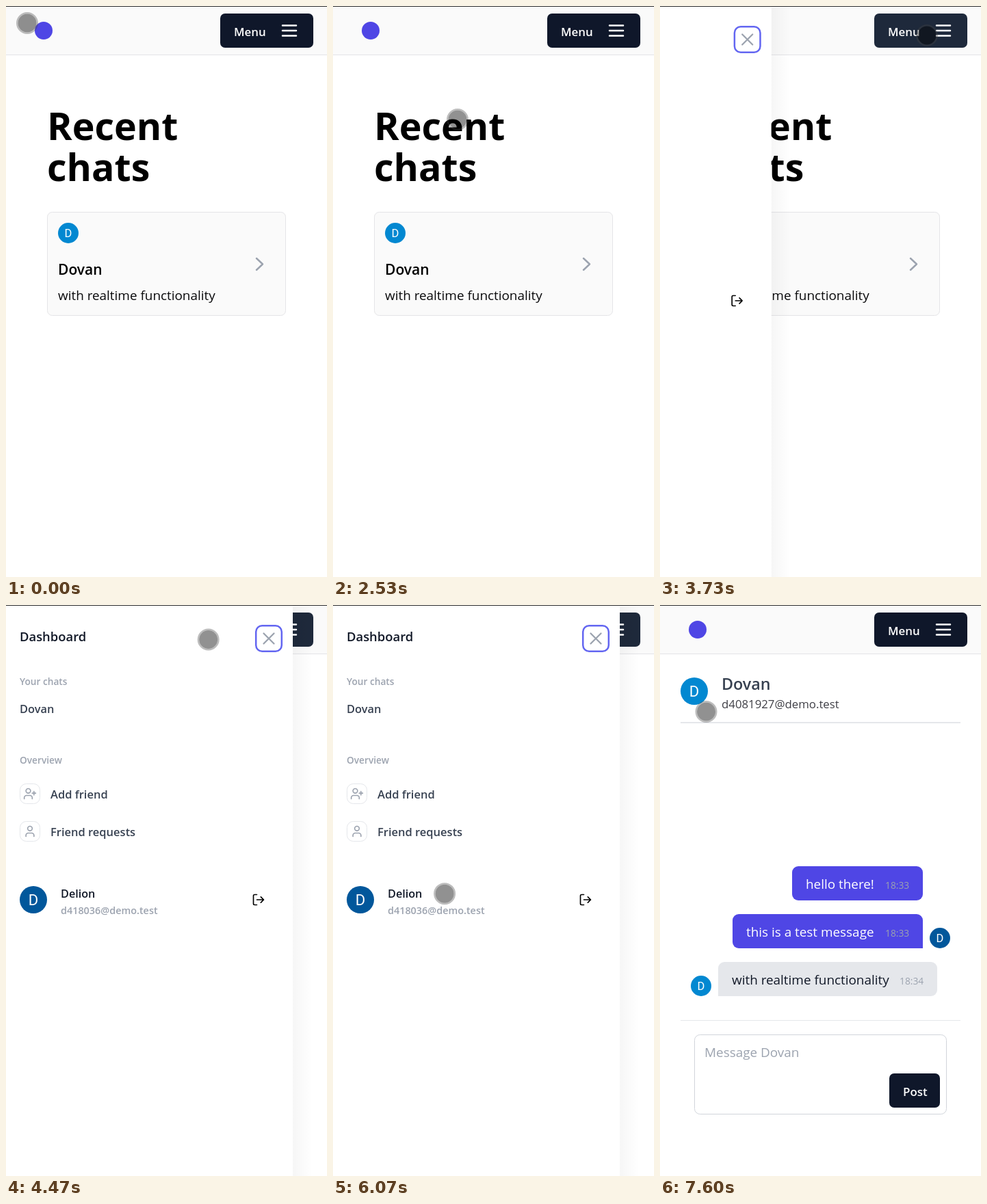
Recreate the animation shown at these times as an HTML page. Size 469 by 835 pixels, loop 8 s.

```html
<!DOCTYPE html>
<html lang="en">
<head>
<meta charset="utf-8">
<title>Chat app</title>
<style>
  html, body { margin: 0; width: 100%; height: 100%; overflow: hidden; background: #fff; }
  svg { display: block; width: 100%; height: 100%; font-family: "Open Sans", "Noto Sans", sans-serif; }
  .avatar { font-family: Roboto, sans-serif; text-anchor: middle; }
  .line { fill: none; stroke-linecap: round; stroke-linejoin: round; }
</style>
</head>
<body>
<svg id="stage" viewBox="0 0 469 835"></svg>
<script>
const LOOP = 8000, TICK = 1000 / 15, DRAWER_WIDTH = 419;
const TAP_MENU = 3580, TAP_FRIEND = 7000, OPEN_CHAT = 7530;
const FRIEND = 'Dovan', OWNER = 'Delion';
const INK = '#111827', SLATE = '#374151', GRAY = '#9ca3af', LINE = '#e5e7eb';
const NAVY = '#0f172a', INDIGO = '#4f46e5', SKY = '#0288d1', DEEP = '#01579b';

const text = (x, y, size, str, fill = INK, weight = 400, extra = '') =>
  `<text x="${x}" y="${y}" font-size="${size}" fill="${fill}" font-weight="${weight}" ${extra}>${str}</text>`;
const box = (x, y, w, h, r, fill, extra = '') =>
  `<rect x="${x}" y="${y}" width="${w}" height="${h}" rx="${r}" fill="${fill}" ${extra}/>`;
const outlined = (x, y, w, h, r, fill, color) =>
  box(x + .5, y + .5, w - 1, h - 1, r, fill, `stroke="${color}"`);
const line = (x, y, color, width, d, scale = 1) =>
  `<path class="line" transform="translate(${x} ${y}) scale(${scale})" stroke="${color}" stroke-width="${width}" d="${d}"/>`;
const icon = (x, y, color, d) => line(x, y, color, 2, d, 20 / 24);
const avatar = (x, y, r, fill) =>
  `<circle cx="${x}" cy="${y}" r="${r}" fill="${fill}"/>` +
  text(x, y + r * .4, r * 1.1, 'D', '#fff', 400, 'class="avatar"');
const button = (x, y, w, label, id) =>
  box(x, y, w, 50, 7, NAVY, `id="${id}"`) + text(x + 20, y + 33, 16.9, label, '#fff', 600);
const heading = (y, str) => text(60, y, 55.5, str, '#000', 700);
const label = (y, str) => text(20, y, 13.7, str, GRAY, 600);

// Speech bubble; the bottom corner beside an avatar stays square
function message(str, time, row, left, right, own, withAvatar) {
  const y = 382 + 70 * row, fill = own ? INDIGO : LINE;
  const side = withAvatar
    ? box(own ? right - 10 : left, y + 40, 10, 10, 0, fill) +
      avatar(own ? right + 25 : left - 25, y + 35, 15, own ? DEEP : SKY)
    : '';
  return box(left, y, right - left, 50, 9, fill) + side +
    text(left + 20, y + 33, 18.9, str, own ? '#fff' : INK) +
    text(right - 55, y + 33, 13.8, time, GRAY);
}

function action(str, row, glyph) {
  const y = 261 + 55 * row;
  return outlined(20, y, 30, 30, 9, '#fff', LINE) + icon(25, y + 5, GRAY, glyph) +
    text(65, y + 22, 16.5, str, SLATE, 600);
}

const person = x =>
  `M${x + 7} 21v-2a4 4 0 0 0-4-4H${x - 3}a4 4 0 0 0-4 4v2M${x - 4} 7a4 4 0 1 0 8 0a4 4 0 1 0-8 0`;

const header =
  box(0, 0, 469, 71, 0, '#fafafa') + box(0, 71, 469, 1, 0, '#e4e4e7') +
  `<circle cx="55" cy="36" r="13" fill="${INDIGO}"/>` +
  `<g id="focus">${box(308, 6, 146, 60, 12, '#94a3b8')}${box(310.5, 8.5, 141, 55, 9, '#fff')}</g>` +
  button(313, 11, 136, 'Menu', 'menu') +
  line(404, 36, '#fff', 2.5, 'M0-7.5h20M0 0h20M0 7.5h20');

const recent =
  heading(196, 'Recent') + heading(256, 'chats') +
  outlined(60, 301, 349, 152, 7, '#fafafa', '#e4e4e7') +
  avatar(91, 332, 15, SKY) +
  text(76, 393, 21, FRIEND, '#000', 600) +
  text(76, 430, 18.9, 'with realtime functionality', '#09090b') +
  line(366, 377.5, GRAY, 2.5, 'M0-8.5l9 8.5l-9 8.5');

const chat =
  avatar(50, 126, 20, SKY) +
  text(90, 124, 23.3, FRIEND, SLATE, 600) +
  text(90, 151, 16.8, 'd4081927@demo.test', '#3f3f46') +
  box(30, 171, 409, 2, 0, LINE) +
  message('hello there!', '18:33', 0, 193, 384, true, false) +
  message('this is a test message', '18:33', 1, 106, 384, true, true) +
  message('with realtime functionality', '18:34', 2, 85, 405, false, true) +
  box(30, 607, 409, 1, 0, LINE) +
  outlined(50, 628, 369, 117, 8, '#fff', '#d1d5db') +
  text(65, 661, 18.9, 'Message ' + FRIEND, GRAY) +
  button(335, 685, 74, 'Post', 'post');

const drawer =
  box(DRAWER_WIDTH, 0, 28, 835, 0, 'url(#shade)') + box(0, 0, DRAWER_WIDTH, 835, 0, '#fff') +
  text(20, 53, 18.4, 'Dashboard', INK, 600) +
  box(365.2, 30.2, 37.6, 37.6, 9, 'none', 'stroke="#6366f1" stroke-width="2.5"') +
  line(384, 49, GRAY, 2.3, 'M-7.5-7.5l15 15m0-15l-15 15') +
  label(117, 'Your chats') +
  box(10, 127, 399, 50, 7, '#f9fafb', 'id="linkHover"') +
  text(20, 158, 16.4, FRIEND, SLATE, 600, 'id="link"') +
  label(232, 'Overview') +
  action('Add friend', 0, person(9) + 'M19 8v6M22 11h-6') +
  action('Friend requests', 1, person(12)) +
  avatar(40, 431, 20, DEEP) +
  text(80, 428, 16.2, OWNER, INK, 600) +
  text(80, 452, 14.4, 'd418036@demo.test', GRAY, 600) +
  icon(359, 421, '#000', 'M9 21H5a2 2 0 0 1-2-2V5a2 2 0 0 1 2-2h4M16 17l5-5l-5-5M21 12H9');

document.getElementById('stage').innerHTML =
  `<defs><linearGradient id="shade">
     <stop stop-opacity=".035"/><stop offset="1" stop-opacity="0"/>
   </linearGradient></defs>` +
  header + `<g id="recent">${recent}</g><g id="chat">${chat}</g><g id="drawer">${drawer}</g>` +
  `<g id="cursor"><circle r="13.5" fill-opacity=".43"/>
     <circle r="14.75" fill="none" stroke="#444" stroke-opacity=".35" stroke-width="2.5"/></g>` +
  box(0, 0, 469, 1, 0, '#2b2b2b');

const part = id => document.getElementById(id);
const show = (id, on) => part(id).setAttribute('visibility', on ? 'visible' : 'hidden');
const progress = (t, from, to) => Math.min(1, Math.max(0, (t - from) / (to - from)));
const bezier = (u, a, b, c, d) => {
  const v = 1 - u;
  return a * v * v * v + 3 * b * v * v * u + 3 * c * v * u * u + d * u * u * u;
};
const smooth = u => bezier(u, 0, 0, 1, 1);

// Pointer gestures: each one sweeps along a Bezier curve, then rests at its end
const gestures = [
  { from: 267, to: 333, x: [31, 31, 27, 27], y: [25, 25, 25, 25] },
  { from: 2533, to: 3440, x: [182, 280, 552, 390], y: [166, 540, 370, 43] },
  { from: 4280, to: 5140, x: [390, 120, -70, 110], y: [43, 20, 390, 284] },
  { from: 5340, to: 5933, x: [110, 106, 140, 163], y: [284, 330, 400, 421] },
  { from: 6030, to: 6867, x: [163, 170, 75, 67.5], y: [421, 490, 190, 156] }
];

function pointerAt(t) {
  const { from, to, x, y } = gestures.filter(g => g.from <= t).pop() || gestures[0];
  const u = smooth(progress(t, from, to));
  return [bezier(u, ...x), bezier(u, ...y)];
}

// cubic-bezier(.4, 0, .2, 1), solved by bisection
function easeInOut(x) {
  let lo = 0, hi = 1;
  for (let i = 0; i < 24; i++) {
    const mid = (lo + hi) / 2;
    if (bezier(mid, 0, .4, .2, 1) < x) lo = mid; else hi = mid;
  }
  return smooth(lo);
}

function render(ms) {
  // The screen updates 15 times per second
  const t = Math.floor((ms % LOOP + 4) / TICK) * TICK + .5;
  const chatOpen = t > OPEN_CHAT, tapped = t > TAP_FRIEND;

  show('recent', !chatOpen);
  show('chat', chatOpen);
  show('drawer', t > TAP_MENU && !chatOpen);
  const slide = easeInOut(progress(t, TAP_MENU, TAP_MENU + 500));
  part('drawer').setAttribute('transform', `translate(${DRAWER_WIDTH * (slide - 1)})`);

  show('focus', t > TAP_MENU - 80 && t < TAP_MENU + 20);
  const hover = progress(t, 3400, 3550) - progress(t, TAP_FRIEND - 40, TAP_FRIEND + 160);
  part('menu').setAttribute('fill', `rgb(${15 + 15 * hover} ${23 + 18 * hover} ${42 + 17 * hover})`);
  show('linkHover', tapped && !chatOpen);
  part('link').setAttribute('fill', tapped ? INDIGO : SLATE);

  show('cursor', t < 390 || t > 2530);
  part('cursor').setAttribute('transform', `translate(${pointerAt(t)})`);
}

const start = performance.now();
function frame() {
  render(performance.now() - start);
  requestAnimationFrame(frame);
}
frame();
</script>
</body>
</html>
```
